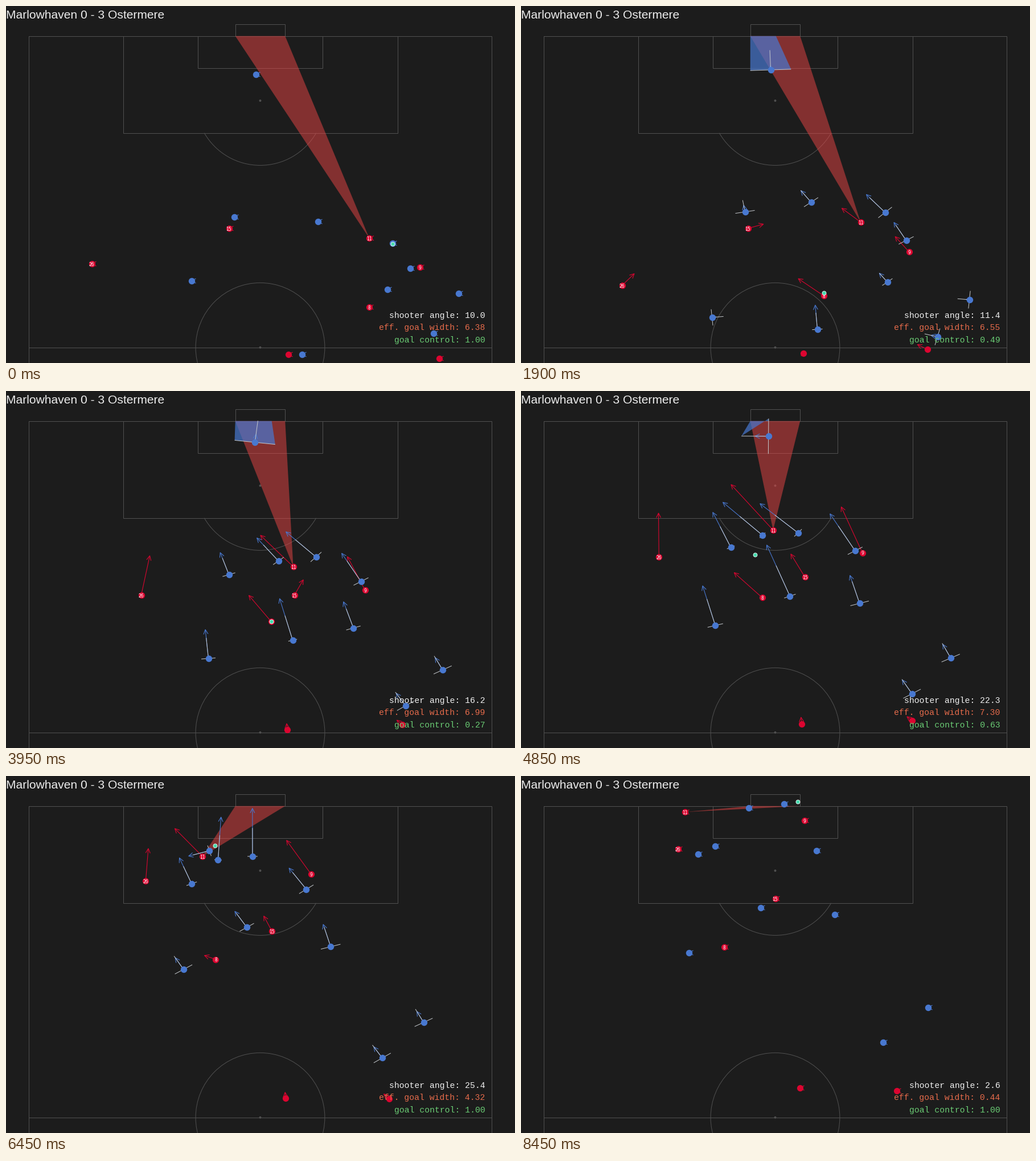
A matplotlib script that plays this animation: 894x626 px, repeating every 8.55 s.

```python
import numpy as np
import matplotlib.pyplot as plt
from matplotlib.animation import FuncAnimation
from matplotlib.collections import LineCollection
from matplotlib.patches import Arc, Circle, Polygon, Rectangle

W, H, DPI = 894, 626, 100
PX = 72 / DPI                       # points per pixel
STEP, FRAMES = 50, 171
LAST = FRAMES - 2                   # the final pose is held for two ticks
BG, LINE = "#1c1c1c", "#505050"
BLUE, RED, MINT = "#4878d0", "#dc0530", "#45dcae"

METRE = np.array([11.95, 10.3])     # pixels per metre across and along the pitch
MID, GOAL_Y, SPOT_Y, HALF_Y, RING = 447, 52.7, 166, 598.8, 113.4
LEFT, RIGHT = MID - 43.75, MID + 43.75

# Key times in seconds: a run with turns, a steady jog, the keeper's dash
RUN = (0, 1.9, 3.95, 5.7, 7.2, 8.45)
JOG = (0, 1.9, 7.2, 8.45)
DASH = (0, 1.9, 3.95, 4.6, 5.7, 6.3, 7.2, 8.45)


class Player:
    """Smooth path through a few key points; speeds follow from the points."""

    def __init__(self, *points, times=RUN, number=None, reach=1):
        self.times, self.pos = np.array(times), np.array(points, float)
        self.vel = np.gradient(self.pos, self.times, axis=0, edge_order=2)
        self.number, self.reach = number, reach

    def at(self, t):
        """Position and velocity on the cubic Hermite curve."""
        k = min(np.searchsorted(self.times, t, side="right"), len(self.times) - 1)
        span = self.times[k] - self.times[k - 1]
        u = (t - self.times[k - 1]) / span
        p, q = self.pos[k - 1:k + 1]
        a, b = self.vel[k - 1:k + 1] * span
        c2, c3 = 3 * (q - p) - 2 * a - b, 2 * (p - q) + a + b
        pos = p + u * (a + u * (c2 + u * c3))
        return pos, (a + u * (2 * c2 + 3 * u * c3)) / span


keeper = Player((439, 120), (439, 112), (437.7, 90), (439.5, 80), (401.5, 94),
                (364, 128), (342, 123), (341, 123), times=DASH, reach=2)
shooter = Player((638.5, 407), (597, 379), (505, 308), (385.5, 181.5),
                 (314.5, 107.25), (288, 63.2), number=11)
blues = [
    keeper,
    Player((401, 370), (394, 361), (392, 322), (344, 225), (314, 160), (311, 137)),
    Player((548, 378), (510, 344), (479, 298), (379, 201), (380, 98), (400, 56)),
    Player((679, 416), (640, 362), (545, 291), (443, 200), (438, 87), (462, 49)),
    Player((710, 460), (677, 411), (624, 334), (553, 230), (512, 172), (519, 131)),
    Player((326, 482), (336, 546), (356, 469), (324, 361), (303, 326), (295, 310)),
    Player((520, 611), (521, 567), (504, 437), (442, 295), (413, 248), (421, 231)),
    Player((670, 497), (644, 484), (562, 274), (551, 243), times=JOG),
    Player((795, 504), (788, 515), (726, 420), (715, 406), times=JOG),
    Player((751, 574), (732, 580), (651, 482), (636, 467), times=JOG),
]
reds = [
    shooter,
    Player((151, 452), (178, 490), (238, 358), (243, 230), (252, 149), (276, 128),
           number=26),
    Player((392, 390), (399, 390), (507, 358), (479, 294), (458, 252), (447, 215),
           number=15),
    Player((727, 458), (682, 431), (631, 349), (568, 219), (510, 131), (498, 78),
           number=9),
    Player((638, 528), (532, 508), (466, 404), (388, 332), (358, 316), (357, 300),
           number=8),
    Player((761, 618), (714, 602), (696, 585), (680, 572), (667, 560), (660, 552)),
    Player((496, 611), (496, 609), (491, 558), (490, 547), times=JOG),
]
passer = reds[4]


def ball_at(t):
    """Won by the passer, carried, played through, then shot into the net."""
    win, give, meet, shot, net = 1.3, 3.95, 5.7, 6.2, 7.55
    if win <= t <= give:
        lead = np.array([0, -7]) * np.sin(np.pi * (t - win) / (give - win))
        return passer.at(t)[0] + lead
    times = (0, win, give, meet, shot, net)
    stops = ((679.5, 416.5), passer.at(win)[0], passer.at(give)[0],
             (360, 177), (340, 140), (486, 45))
    return np.array([np.interp(t, times, axis) for axis in zip(*stops)])


fig = plt.figure(figsize=(W / DPI, H / DPI), dpi=DPI, facecolor=BG)
ax = fig.add_axes([0, 0, 1, 1])
ax.set_xlim(0.5, W + 0.5)
ax.set_ylim(H, 0)
ax.axis("off")


def box(half, y0, y1):
    ax.add_patch(Rectangle((MID - half, y0), 2 * half, y1 - y0, fill=False,
                           ec=LINE, lw=PX, zorder=1))


def draw_pitch():
    box(406.2, GOAL_Y, 2 * HALF_Y - GOAL_Y)
    box(241, GOAL_Y, 222.7)
    box(109.5, GOAL_Y, 109.3)
    box(RIGHT - MID, 32.3, GOAL_Y)
    ax.plot([MID - 406.2, MID + 406.2], [HALF_Y] * 2, color=LINE, lw=PX, zorder=1)
    ax.add_patch(Circle((MID, HALF_Y), RING, fill=False, ec=LINE, lw=PX))
    cut = np.degrees(np.arccos((222.7 - SPOT_Y) / RING))
    ax.add_patch(Arc((MID, SPOT_Y), 2 * RING, 2 * RING, theta1=90 - cut,
                     theta2=90 + cut, color=LINE, lw=PX))
    for y in (SPOT_Y, HALF_Y):
        ax.add_patch(Circle((MID, y), 2, color=LINE, lw=0))


def lines(color, width, z):
    return ax.add_collection(
        LineCollection([], colors=color, linewidths=width * PX, zorder=z))


def dots(color, radius, z, **kw):
    return ax.scatter([], [], s=(2 * radius * PX) ** 2, fc=color, zorder=z, **kw)


def area(color, alpha, z):
    return ax.add_patch(Polygon([(0, 0)] * 3, fc=color, alpha=alpha, lw=0, zorder=z))


def label(y, color):
    return ax.text(842, y, "", color=color, family="Liberation Mono",
                   size=14.8 * PX, ha="right", va="baseline", zorder=12)


draw_pitch()
cone, shade = area("#ea4545", 0.5, 2), area(BLUE, 0.7, 3)
blue_arrows, red_arrows = lines(BLUE, 1.1, 4), lines(RED, 1.1, 4)
reach_lines = lines("#c4c8cc", 1.0, 5)
blue_dots, red_dots = dots(BLUE, 5.7, 6, lw=0), dots(RED, 5.6, 6, lw=0)
ball = dots(MINT, 3.5, 9, ec="white", lw=0.8 * PX)
numbers = {r: ax.text(0, 0, str(r.number), color="white", family="DejaVu Sans",
                      size=7.6 * PX, ha="center", va="center_baseline", zorder=8)
           for r in reds if r.number}
ax.text(0.5, 21.5, "Marlowhaven 0 - 3 Ostermere", color="#ececec",
        family="Liberation Sans", size=21 * PX, va="baseline", zorder=12)
angle_text = label(547, "#f0f0f0")
width_text = label(568, "#e66b4b")
control_text = label(590, "#6acc74")


def arrow(pos, vel):
    """Shaft and open head; without speed only a head facing left."""
    speed = np.hypot(*vel)
    d = vel / speed if speed > 0.5 else np.array([-1.0, 0.0])
    side = np.array([-d[1], d[0]])
    tip = pos + vel
    back = tip - 8 * d
    return [[pos, tip], [back + 4 * side, tip, back - 4 * side]]


def reach_points(player, pos, vel, ball_pos):
    """Left, right and front limits of what a defender controls."""
    v = vel / METRE
    speed = np.hypot(*v)
    d = v / max(speed, 1e-6)
    gap = np.hypot(*((ball_pos - pos) / METRE))
    r = player.reach * min(1.5, 0.4 + 0.058 * gap)
    side = r * np.array([-d[1], d[0]]) * METRE
    return pos - side, pos + side, pos + (r + 0.5 * speed) * d * METRE


def shadow(eye, points):
    """Part of the goal hidden from the eye by the given points."""
    hits = sorted(
        (eye[0] + (p[0] - eye[0]) * (eye[1] - GOAL_Y) / (eye[1] - p[1]), *p)
        for p in points if p[1] < eye[1] - 2)
    if len(hits) < 2:
        return None
    lo, hi = hits[0], hits[-1]
    x0, x1 = np.clip([lo[0], hi[0]], LEFT, RIGHT)
    if x1 <= x0:
        return None
    return [(x0, GOAL_Y), (x1, GOAL_Y), hi[1:], lo[1:]]


def shot_stats(eye):
    a, b = ((np.array([x, GOAL_Y]) - eye) / METRE for x in (LEFT, RIGHT))
    angle = np.arccos(a @ b / np.hypot(*a) / np.hypot(*b))
    near = min(np.hypot(*a), np.hypot(*b))
    return np.degrees(angle), 2 * near * np.sin(angle / 2)


def update(i):
    i = min(i, LAST)
    t = i * STEP / 1000
    moving = 0 < i < LAST           # no speeds are known at either end
    ball_pos = ball_at(t)
    ball.set_offsets([ball_pos])

    for team, dot, arrows in ((blues, blue_dots, blue_arrows),
                              (reds, red_dots, red_arrows)):
        states = [p.at(t) for p in team]
        dot.set_offsets([pos for pos, _ in states])
        arrows.set_segments([s for pos, vel in states
                             for s in arrow(pos, vel * moving)])
    for player, text in numbers.items():
        text.set_position(player.at(t)[0] + (0, 0.3))

    eye = shooter.at(t)[0]
    hidden, marks = None, []
    if moving:
        reaches = [reach_points(p, *p.at(t), ball_pos) for p in blues]
        hidden = shadow(eye, reaches[0])
        for p, (left, right, front) in zip(blues, reaches):
            marks += [[left, right], [p.at(t)[0], front]]
    reach_lines.set_segments(marks)

    cone.set_xy([eye, (LEFT, GOAL_Y), (RIGHT, GOAL_Y)])
    shade.set_visible(hidden is not None)
    control = 1.0
    if hidden:
        shade.set_xy(hidden)
        control -= (hidden[1][0] - hidden[0][0]) / (RIGHT - LEFT)
    angle, width = shot_stats(eye)
    angle_text.set_text(f"shooter angle: {angle:.1f}")
    width_text.set_text(f"eff. goal width: {width:.2f}")
    control_text.set_text(f"goal control: {control:.2f}")


anim = FuncAnimation(fig, update, frames=FRAMES, interval=STEP, repeat=True,
                     repeat_delay=0, cache_frame_data=False)
plt.show()
```
